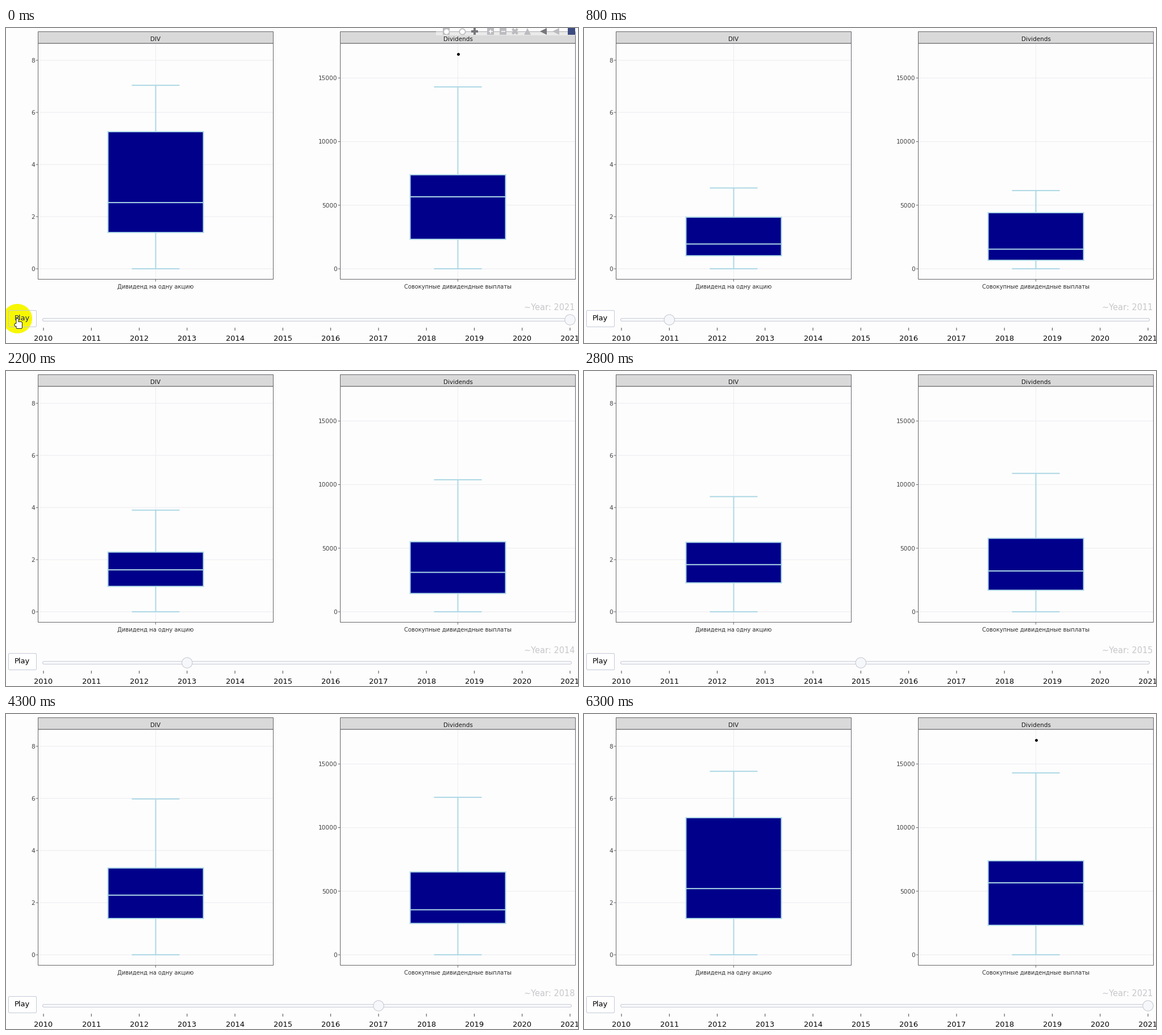
Animation of 1007x556 px, one loop 9.2 s. Source, as a matplotlib script:

```python
import matplotlib.pyplot as plt
import numpy as np
from matplotlib.animation import FuncAnimation
from matplotlib.patches import Circle, FancyBboxPatch, Rectangle

W, H, DPI = 1007, 556, 64
FRAMES, STEP = 92, 100
PT = 72 / DPI  # points per pixel

BG, EDGE, GRID = "#fdfdfd", "#66666c", "#ededf2"
NAVY, SKY = "#00008b", "#add8e6"
RAIL_FILL, RAIL_EDGE = "#f7f8fb", "#c9ccd6"
GREY, DARK = "#bcbcc0", "#77777c"

FIRST, LAST = 2010, 2021
FIRST_FRAME, YEAR_FRAMES = 1.95, 5.2
GRIP_LAG, BOX_LAG = 1, 3  # frames after the year label

plt.rcParams["font.family"] = "DejaVu Sans"
fig = plt.figure(figsize=(W / DPI, H / DPI), dpi=DPI, facecolor=BG)
ax = fig.add_axes([0, 0, 1, 1])
ax.set(xlim=(0, W), ylim=(H, 0))
ax.axis("off")


def line(xs, ys, color, width=1, z=1):
    return ax.plot(xs, ys, color=color, lw=width * PT, zorder=z, snap=False,
                   solid_capstyle="butt", solid_joinstyle="miter")[0]


def text(x, mid, s, px, color, ha="center"):
    """Text whose capitals are centred vertically on mid."""
    return ax.text(x, mid + 0.365 * px, s, fontsize=px * PT, color=color,
                   ha=ha, va="baseline", zorder=6)


def rect(x0, y0, x1, y1, face, edge="none", width=1, z=1):
    return ax.add_patch(Rectangle((x0, y0), x1 - x0, y1 - y0, fc=face, ec=edge, snap=False,
                                  lw=width * PT, zorder=z, joinstyle="miter"))


def rounded(x0, y0, x1, y1, r, face, edge, z=5, width=1):
    return ax.add_patch(FancyBboxPatch(
        (x0, y0), x1 - x0, y1 - y0, boxstyle=f"round,pad=0,rounding_size={r}",
        fc=face, ec=edge, lw=width * PT, zorder=z, snap=False))


def dot(x, y, r, face, edge="none", z=6):
    return ax.add_patch(Circle((x, y), r, fc=face, ec=edge, lw=PT, zorder=z))


def track(**points):
    """Straight runs between a few key years, given as y10=..., y13=..."""
    years = [2000 + int(k[1:]) for k in points]
    return lambda year: np.interp(year, years, list(points.values()))


def swell(low, rise, span):
    """Quarter-sine growth that flattens after span years."""
    return lambda year: low + rise * np.sin(np.pi / 2 * (year - FIRST) / span)


def power(low, high, p):
    return lambda year: low + (high - low) * ((year - FIRST) / (LAST - FIRST)) ** p


# Upper whisker, Q3, median, Q1
PER_SHARE = [track(y10=3.1, y13=3.9, y17=5.98, y19=8.24, y21=7.04),
             track(y10=1.98, y13=2.29, y15=3.04, y17=3.33, y21=5.26),
             swell(0.95, 1.59, 11),
             swell(0.5, 0.95, 9)]
TOTALS = [track(y10=6150, y13=10380, y17=12380, y19=10070, y21=14300),
          power(4410, 7390, 0.77),
          track(y10=1540, y13=3100, y17=3540, y21=5660),
          track(y10=670, y19=2980, y21=2320)]
OUTLIERS = {2019: [14080, 13540], 2021: [16860]}


class Panel:
    """One facet with a strip title, an axis and a single box plot."""

    BASE = 425

    def __init__(self, left, right, title, label, ticks, scale, stats, outliers):
        self.scale, self.stats, self.outliers = scale, stats, outliers
        self.cx = cx = (left + right) / 2
        for v in ticks:
            y = self.y(v)
            line([left, right], [y, y], GRID)
            line([left - 4, left], [y, y], EDGE)
            text(left - 5.5, y, str(v), 10.5, "#404040", "right")
        line([cx, cx], [27, 443.5], GRID)
        line([cx, cx], [443.5, 447.5], EDGE)
        rect(left, 27, right, 443.5, "none", EDGE, z=5)
        rect(left, 6.5, right, 27, "#d9d9d9", EDGE, z=5)
        text(cx, 19.5, title, 10.4, "#1a1a1a")
        text(cx, 456.5, label, 10.05, "#333333")
        self.whisker = line([], [], SKY, 2, 3)
        self.box = rect(cx - 84, 0, cx + 84, 1, NAVY, SKY, 2, 4)
        self.median = line([], [], SKY, 2, 4.5)
        self.dots = ax.plot([], [], "o", color="black", ms=5 * PT, mew=0, zorder=4)[0]

    def y(self, v):
        return self.BASE - self.scale * np.asarray(v)

    def show(self, year):
        top, q3, med, q1 = (self.y(stat(year)) for stat in self.stats)
        cx, base, gap = self.cx, self.BASE, np.nan
        cap = [cx - 42, cx + 42, gap]
        stem = [cx, cx, gap]
        self.whisker.set_data(
            cap + stem + stem + cap,
            [top, top, gap, top, q3, gap, q1, base, gap, base, base, gap])
        self.box.set(y=q3, height=q1 - q3)
        self.median.set_data([cx - 84, cx + 84], [med, med])
        points = self.outliers.get(year, [])
        self.dots.set_data([cx] * len(points), self.y(points))


def make_toolbar():
    """Row of small icons cut off by the top edge: outer shape, inner mark."""
    groups = [(775, "s", "o"), (803, "oP", "o "), (853, "ssX^", "+_  "),
              (946, "<<", "  ")]
    parts = [rect(757, 0, 1004, 13, "#ffffff80", z=7),
             rect(989, 0, 1002, 12, "#3c4c80", z=8)]
    for x0, outers, inners in groups:
        for i, (outer, inner) in enumerate(zip(outers, inners)):
            x = x0 + 21.5 * i
            color = DARK if outer == "P" or x == 946 else GREY
            parts += ax.plot(x, 5.5, outer, color=color, ms=12 * PT, mew=0, zorder=8)
            if inner != " ":
                parts += ax.plot(x, 5.5, inner, color="white", ms=7 * PT,
                                 mew=1.5 * PT, zorder=9)
    return parts


def make_pointer():
    """Click highlight and a pointing hand: finger, palm and thumb."""
    parts = [dot(20, 513, 26, "#f7f700", z=5.2)]
    for face, edge, z in (("#202020", "#202020", 8), ("white", "none", 9)):
        for x0, y0, x1, y1 in ((18.5, 513, 21.5, 526), (18.5, 519, 28, 530),
                               (15.5, 522, 20, 526)):
            parts.append(rounded(x0, y0, x1, y1, 1.5, face, edge, z, 2))
    return parts


def tick_x(year):
    return 66 + 84.27 * (year - FIRST)


def year_at(n):
    """Year reached by frame n; before playback starts it is the last one."""
    i = int((n - int(FIRST_FRAME) + YEAR_FRAMES) // YEAR_FRAMES)
    while int(FIRST_FRAME + YEAR_FRAMES * i) > n:
        i -= 1
    return min(FIRST + i, LAST) if i >= 0 else LAST


panels = [
    Panel(56.5, 470.5, "DIV", "Дивиденд на одну акцию",
          range(0, 9, 2), 46.0, PER_SHARE, {}),
    Panel(588.5, 1002.5, "Dividends", "Совокупные дивидендные выплаты",
          range(0, 15001, 5000), 0.02245, TOTALS, OUTLIERS),
]

rounded(4.5, 498.5, 53.5, 527.5, 2, "white", "none")
rounded(4.5, 498.5, 53.5, 527.5, 2, "none", "#c4cad8", 5.5)
play = text(28.5, 511, "Play", 13, "black")
rounded(64.5, 512.5, 995.5, 517.5, 2.5, RAIL_FILL, RAIL_EDGE)
for yr in range(FIRST, LAST + 1):
    line([tick_x(yr)] * 2, [529, 534], "#444444")
    text(tick_x(yr), 547, str(yr), 13, "black")
grip = dot(0, 515, 9.2, "#f6f7fa", "#c6c8d0")
caption = text(1001, 493, "", 14.5, "#c8c8cc", "right")
toolbar = make_toolbar()
pointer = make_pointer()


def update(n):
    caption.set_text(f"~Year: {year_at(n)}")
    grip.center = (tick_x(year_at(n - GRIP_LAG)), 515)
    for panel in panels:
        panel.show(year_at(n - BOX_LAG))

    pressed = n < 2
    play.set_color("#1c2470" if pressed else "black")
    for part in pointer:
        part.set_visible(pressed)
    for part in toolbar:
        part.set_visible(n < 4)
        part.set_alpha(min(1, max(0, 1 - (n - 1) / 3)) * (0.45 if part is toolbar[0] else 1))
    return []


anim = FuncAnimation(fig, update, frames=FRAMES, init_func=lambda: update(0),
                     interval=STEP, repeat=True, repeat_delay=0, blit=False)
plt.show()
```
